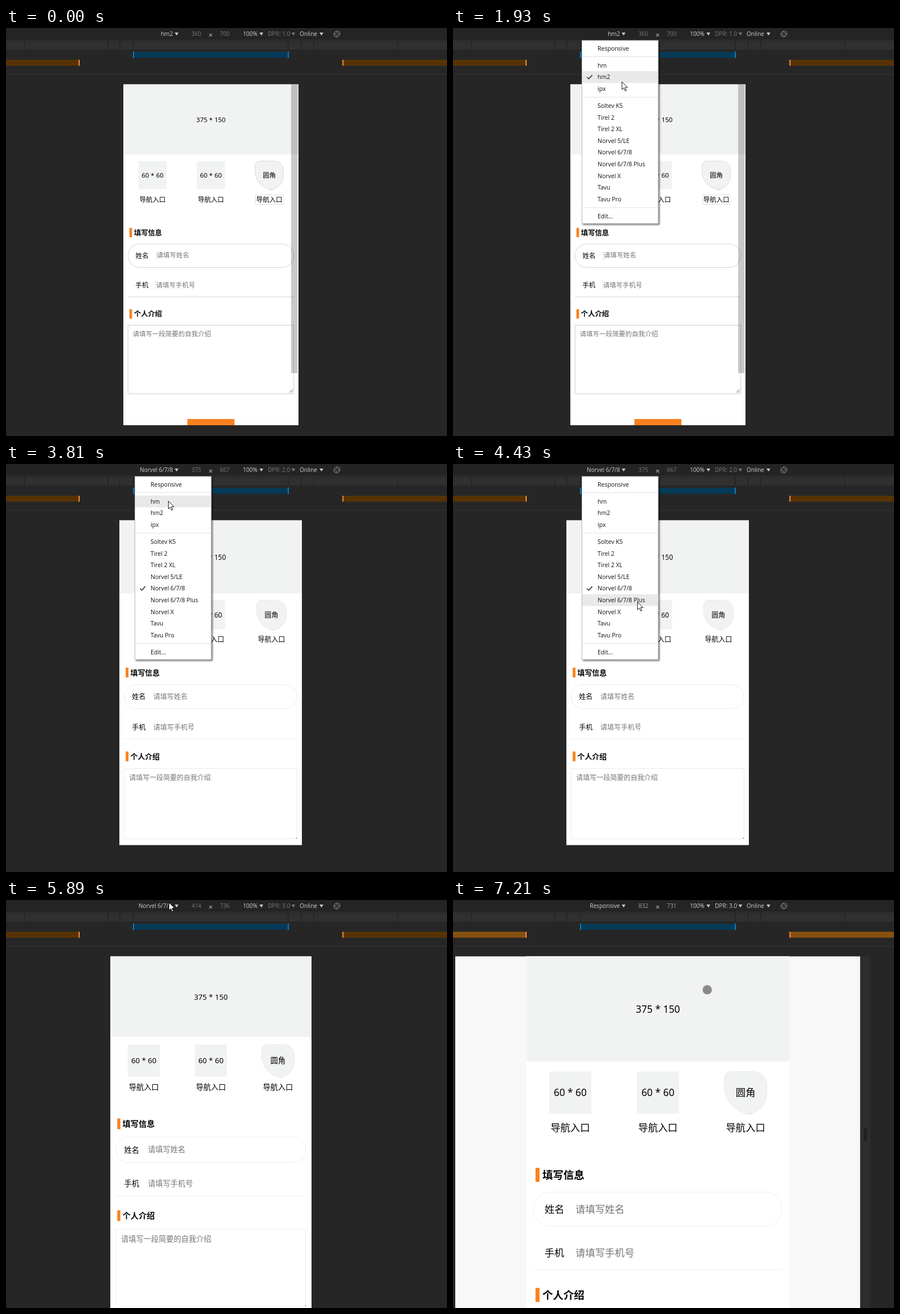
Animation of 778 by 720 pixels, one loop 8000 ms. Source, as an HTML page:

```html
<!DOCTYPE html>
<html lang="zh">
<head>
<meta charset="utf-8">
<title>Device preview</title>
<style>
html, body { margin: 0; width: 100%; height: 100%; overflow: hidden; background: #262626; }
svg { display: block; }
text { white-space: pre; }
.ui { font-family: "Open Sans", "Noto Sans", sans-serif; }
.page { font-family: "Noto Sans", "Noto Sans CJK SC", "Noto Sans CJK", sans-serif; fill: #000; }
.page .hint { fill: #757575; }
.page .bold { font-weight: 700; }
#menu { filter: drop-shadow(2px 2px 1.5px rgba(0, 0, 0, .55)); }
</style>
</head>
<body>
<svg id="stage" width="778" height="720" viewBox="0 0 778 720"></svg>
<script>
const LOOP = 8000, STEP = 77.55;
const TOP = 99.5;
const ORANGE = '#f9821e', SOFT = '#f1f2f2';

// x, width, bottom, then the vertical places of the page's parts
const layouts = [
  { x: 207, w: 309, end: 701, label: 302.5, head: 361, pill: [381, 422.5], name: 401.5, phone: 454,
    line: 474.5, head2: 504.5, area: [524.5, 645.5], edge: '#d4d4d4', scroll: true },
  { x: 200, w: 322, end: 672.5, label: 309.5, head: 368, pill: [389.5, 431.5], name: 411, phone: 465,
    line: 485, head2: 516, area: [537.5, 661.5], edge: '#ececec' },
  { x: 184, w: 355, end: 720, label: 330, head: 395, pill: [418.5, 463.5], name: 441, phone: 500,
    line: 522.5, head2: 557, area: [580.5, 717], edge: '#efefef' },
  { x: 129.5, w: 464, end: 720, label: 401.5, head: 485, pill: [515.5, 575.5], name: 546, phone: 622.5,
    line: 652, head2: 697, area: [728, 900], edge: '#f0f0f0' }
];

const devices = [
  { title: 'hm2', w: 360, h: 700, dpr: '1.0', check: 2 },
  { title: 'Norvel 6/7/8', w: 375, h: 667, dpr: '2.0', check: 8 },
  { title: 'Norvel 6/7/...', w: 414, h: 736, dpr: '3.0', check: 9 },
  { title: 'Responsive', w: 832, h: 731, dpr: '3.0', check: 0 }
];

const items = ['Responsive', 'hm', 'hm2', 'ipx', 'Soltev K5', 'Tirel 2', 'Tirel 2 XL', 'Norvel 5/LE',
  'Norvel 6/7/8', 'Norvel 6/7/8 Plus', 'Norvel X', 'Tavu', 'Tavu Pro', 'Edit...'];
const rowY = i => 36 + i * 20.6 + (i > 0) * 9.4 + (i > 3) * 9.4 + (i > 12) * 9.4;

const menus = [[19, 36], [47, 60], [79, 87]];

// pointer path: step, x, y
const path = [
  [3, 752, 652], [5, 610, 440], [7, 470, 245], [9, 375, 115], [11, 318, 47], [13, 301, 22],
  [16, 296, 16], [20, 296, 16], [24, 298, 75], [31, 295, 211], [33, 295, 212],
  [36, 295.5, 215], [38, 295.5, 215], [42, 300, 70], [45, 290, 8], [47, 290, 8],
  [49, 286, 65], [53, 322, 255], [54, 322, 255], [57, 325, 243], [66, 326, 243],
  [67, 326, 228], [71, 305, 90], [74, 290, 14], [76, 287, 4], [79, 287, 7],
  [82, 280, 33], [87, 280, 33], [93, 448.5, 158.5]
];

const rect = (x, y, w, h, fill, more = '') =>
  `<rect x="${x}" y="${y}" width="${w}" height="${h}" fill="${fill}" ${more}/>`;
const text = (s, x, y, size, more = '') =>
  `<text x="${x}" y="${y + size * .365}" font-size="${size}" ${more}>${s}</text>`;
const frame = (x, y, w, h, color, more = '') => rect(x, y, w, h, 'none', `stroke="${color}" ${more}`);
const MID = 'text-anchor="middle"';
const HINT = 'class="hint"';

function leaf(x, y, s, r) {
  const [a, b, c, d] = r;
  return `M${x + a} ${y}H${x + s - b}a${b} ${b} 0 0 1 ${b} ${b}V${y + s - c}a${c} ${c} 0 0 1 ${-c} ${c}` +
    `H${x + d}a${d} ${d} 0 0 1 ${-d} ${-d}V${y + a}a${a} ${a} 0 0 1 ${a} ${-a}z`;
}

function page(l, i) {
  const u = l.w / 375, f = 14 * u, X = n => l.x + n * u, mid = X(187.5);
  const side = X(10), span = 355 * u, boxY = TOP + 164.2 * u;
  let s = rect(l.x, TOP, l.w, l.end - TOP, '#fff') + rect(l.x, TOP, l.w, 150 * u, SOFT);
  s += text('375 * 150', mid, TOP + 75.5 * u, f, MID);
  for (let n = 0; n < 3; n++) {
    const c = X(62.5 + 125 * n), box = 60 * u;
    s += n < 2 ? rect(c - box / 2, boxY, box, box, SOFT)
      : `<path d="${leaf(c - box / 2 - .5, boxY, box + 1, [10, 20, 30, 40].map(r => r * u))}" fill="${SOFT}" stroke="${l.scroll ? '#dcdcdc' : '#eaeaea'}"/>`;
    s += text(n < 2 ? '60 * 60' : '圆角', c, boxY + 30 * u, f, MID);
    s += text('导航入口', c, l.label + (l.scroll && n > 1 ? .7 : 0), f, MID);
  }
  if (l.scroll) s += frame(440.5, 294.5, 48, 17, '#e0dfd6');
  for (const [y, t] of [[l.head, '填写信息'], [l.head2, '个人介绍']]) {
    s += rect(X(13), y - 10 * u, 5.7 * u, 20 * u, ORANGE);
    s += text(t, X(22.8), y, 15 * u, 'class="bold"');
  }
  const [p0, p1] = l.pill, [a0, a1] = l.area, right = side + span;
  s += frame(side, p0, span, p1 - p0, l.edge, `rx="${(p1 - p0) / 2}"`);
  s += text('姓名', X(26), l.name, f) + text('请填写姓名', X(l.scroll ? 71.2 : 70), l.name - .4, f, HINT);
  s += text('手机', X(25.8), l.phone, f) + text('请填写手机号', X(70), l.phone - .2, f, HINT);
  s += rect(side, l.line - .5, span, 1, l.edge);
  s += frame(side, a0, span, a1 - a0, l.scroll ? '#cfcfcf' : l.edge);
  s += text('请填写一段简要的自我介绍', X(20), a0 + 18.5 * u, f, HINT);
  if (l.scroll) {
    s += rect(265, 394, 1, 15, '#dedede') + rect(264, 446, 1, 15, '#dedede');
    s += `<path d="M${right - 8} ${a1 - 2}l6-6M${right - 4.5} ${a1 - 2}l2.5-2.5" stroke="#666"/>`;
    s += rect(320, 690, 83, 11, ORANGE) + rect(503, TOP, 11.5, 509.5, '#000', 'fill-opacity=".21"');
  } else s += rect(right - 2, a1 - 2, 1.5, 1.5, '#777');
  return `<g class="page" id="page${i}">${s}</g>`;
}

const caret = (x, id = '') => `<path ${id} d="M${x - 3.3} 8h6.6l-3.3 5.2z" fill="#c8c8c8"/>`;

function chrome() {
  const s = [rect(0, 0, 778, 720, '#262626'), rect(0, 0, 778, 21, '#242424'), rect(0, 21, 778, 1, '#363636')];
  s.push(rect(0, 23.5, 778, 14.5, '#303030'));
  for (const x of [32, 179, 200, 224, 497, 520, 542, 690]) s.push(rect(x, 23.5, 1.5, 14.5, '#222'));
  s.push(rect(224, 42, 275, 10.5, '#063a56', 'id="blue"'));
  for (const x of [224, 497]) s.push(rect(x, 41.5, 2, 11.5, '#0a7cc0'));
  s.push(rect(0, 56, 130, 10.5, '#573204', 'class="amber"'), rect(593.5, 56, 185, 10.5, '#573204', 'class="amber"'));
  for (const x of [128, 593.5]) s.push(rect(x, 56, 2, 10.5, '#f08c3c'));
  s.push(rect(0, 81.3, 778, 1, '#353535'));
  const t = (id, x, str, more = '') => text(str, x, 10.8, 10.1, `id="${id}" fill="#d0d0d0" ${more}`);
  s.push(`<g class="ui">`,
    t('title', 294.5, '', 'text-anchor="end"'), t('w', 336, '', MID), t('h', 386, '', MID),
    t('zoom', 418, '100%'), t('dpr', 462, ''), t('net', 518, 'Online'), '</g>');
  s.push('<path d="M358.4 9.8l5.2 5.2m0-5.2l-5.2 5.2" stroke="#a0a0a0" stroke-width="1.1"/>');
  s.push(caret(301), caret(450.5), caret(507, 'id="dprCaret"'), caret(556.5));
  s.push('<g transform="translate(583.7 10.5) rotate(-45)" fill="none" stroke="#858585">' +
    '<rect x="-2.2" y="-4.5" width="4.4" height="9" rx=".8"/>' +
    '<path d="M-2.5-4.8A5.4 5.4 0 0 0-2.5 4.8M2.5-4.8A5.4 5.4 0 0 1 2.5 4.8"/></g>');
  return s.join('');
}

function wideFrame() {
  return `<g id="wide">${rect(4, TOP, 714.5, 621, '#232323', 'id="canvas"')}${rect(718.5, TOP, 17.5, 621, '#2d2d2d')}` +
    `${rect(725, 403, 1.5, 22, '#161616')}${rect(728, 403, 1.5, 22, '#161616')}</g>`;
}

function menu() {
  let s = rect(227.5, 22, 134.5, 323, '#fff', 'stroke="#bbb"') + rect(228, 0, 133.5, 20.8, '#e9e9e9', 'id="hover"');
  for (const y of [50, 121.5, 316.5]) s += rect(229, y, 132, 1, '#e2e2e2');
  items.forEach((t, i) => s += text(t, 255, rowY(i), 10.5, 'fill="#111"'));
  s += '<path id="check" d="M-4.6 0l3.2 3.2L4.6-3.4" fill="none" stroke="#444" stroke-width="1.8"/>';
  return `<g id="menu" class="ui">${s}</g>`;
}

const pointers = '<g id="pointer" stroke="#000" stroke-linejoin="round" fill="#fff">' +
  '<path id="arrow" stroke-width=".9" d="M.5.5V14.2l3.2-3 2.4 5.4 2.1-.9-2.3-5.2h4.4z"/>' +
  '<path id="hand" stroke-width=".8" d="M-1.6 1.4Q-1.4-.4.1-.3 1.5-.3 1.6 1.4V6.2Q3.4 5.4 4.1 6.8 5.9 6.1 6.5 7.6 8.6 7.2 8.8 9.2V13Q8.6 16 7 19H-.4Q-2-15-2 15-4 13-5.6 10.4-6 8.4-4 8.6L-1.6 10.6z"/>' +
  '<circle id="touch" r="8.2" fill="#8a8a8a" stroke="none"/></g>';

const $ = id => document.getElementById(id);
$('stage').innerHTML = chrome() + wideFrame() + layouts.map(page).join('') + menu() + pointers;
$('hand').setAttribute('d', 'M-1.6 1.4Q-1.4-.4.1-.3 1.5-.3 1.6 1.4V6.2Q3.4 5.4 4.1 6.8 5.9 6.1 6.5 7.6 8.6 7.2 8.8 9.2V13Q8.6 16 7 19H-.4Q-2.6 15-5.6 10.4-6 8.4-4 8.6L-1.6 10.6z');

const show = (id, on) => $(id).style.display = on ? '' : 'none';
const fill = (id, c) => $(id).setAttribute('fill', c);
const stage = (k, ...marks) => marks.filter(m => k >= m).length;

function place(k) {
  if (k < path[0][0]) return null;
  const n = path.findIndex(p => p[0] > k);
  if (n < 0) return path[path.length - 1].slice(1);
  const [k0, x0, y0] = path[n - 1], [k1, x1, y1] = path[n], q = (k - k0) / (k1 - k0);
  return [x0 + (x1 - x0) * q, y0 + (y1 - y0) * q];
}

function draw(k) {
  const now = stage(k, 37, 61, 88), dev = devices[stage(k, 37, 61, 87)], free = k >= 87;
  layouts.forEach((l, i) => show('page' + i, i === now));
  show('wide', free);
  fill('canvas', now === 3 ? '#f8f8f8' : '#232323');
  document.querySelectorAll('.amber').forEach(e => e.setAttribute('fill', now === 3 ? '#86500e' : '#573204'));

  $('title').textContent = dev.title;
  $('w').textContent = dev.w;
  $('h').textContent = dev.h;
  $('dpr').textContent = 'DPR: ' + dev.dpr;
  for (const id of ['w', 'h']) fill(id, free ? '#a0a0a0' : '#777');
  for (const id of ['dpr', 'dprCaret']) fill(id, free ? '#c8c8c8' : '#777');

  const open = menus.some(([a, b]) => k >= a && k < b), at = place(k);
  show('menu', open);
  show('pointer', at);
  const [x, y] = at || [0, 0];
  if (open) {
    const row = items.findIndex((t, i) => Math.abs(rowY(i) - y) < 10.4);
    show('hover', row >= 0);
    if (row >= 0) $('hover').setAttribute('y', rowY(row) - 10.4);
    $('check').setAttribute('transform', `translate(241 ${rowY(dev.check)})`);
  }
  const l = layouts[now], left = now === 3 ? 4 : l.x, right = now === 3 ? 718 : l.x + l.w;
  const touch = !open && y > TOP && y < l.end && x > left && x < right;
  const onBar = !open && x > 224 && x < 499 && y > 23 && y < 53;
  fill('blue', onBar && y > 41 ? '#07588a' : '#063a56');
  show('touch', touch);
  show('hand', onBar);
  show('arrow', !touch && !onBar);
  $('pointer').setAttribute('transform', `translate(${x} ${y})`);
}

let last = -1;
function tick() {
  const k = Math.floor((performance.now() % LOOP + 8) / STEP);
  if (k !== last) draw(last = k);
  requestAnimationFrame(tick);
}
tick();
</script>
</body>
</html>
```
